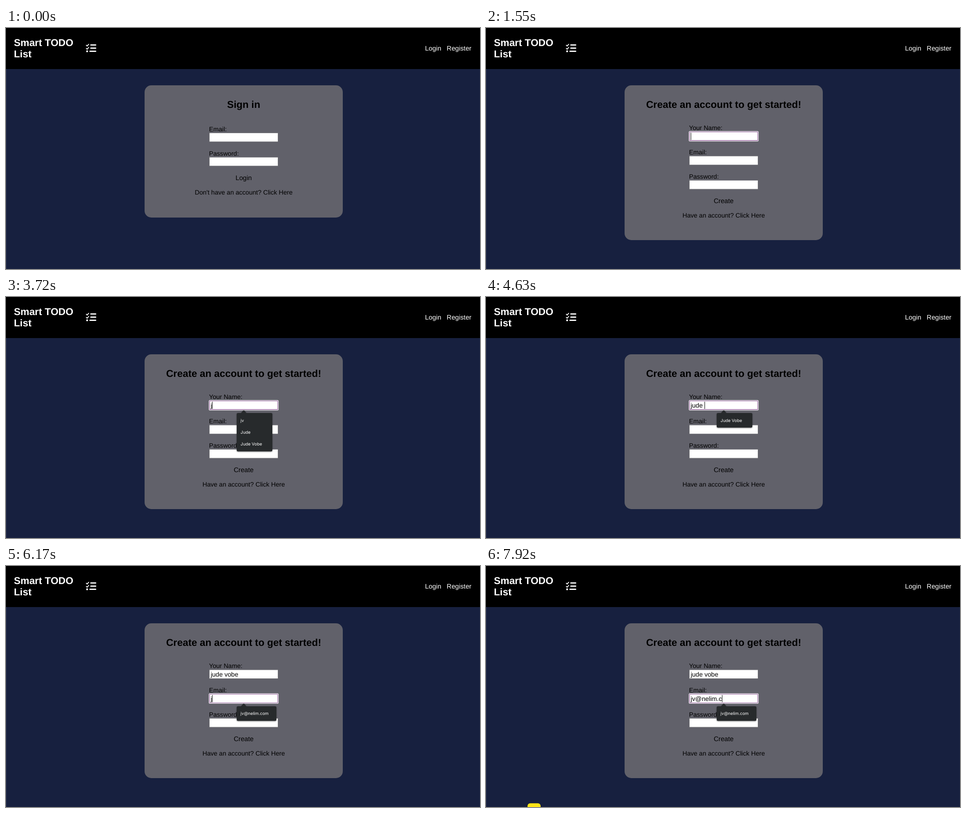
An HTML page for the animation above (7990 ms loop, 1050 by 534 pixels).

```html
<!DOCTYPE html>
<html lang="en">
<head>
<meta charset="utf-8">
<title>Smart TODO List</title>
<style>
  html, body { margin: 0; width: 100%; height: 100%; overflow: hidden; background: #17203f; }
  svg { display: block; width: 1050px; height: 534px; }
  text { font: 14.1px "Liberation Sans", Arial, sans-serif; text-rendering: geometricPrecision; white-space: pre; }
  .big { font-size: 22px; font-weight: bold; }
  .action { font-size: 14.7px; }
  .mid { text-anchor: middle; }
  .light { fill: #fff; }
  .card { fill: #61616a; }
  .field { fill: #fff; stroke: #76767a; stroke-width: .9; }
  .glow { fill: #fff; }
  .ring { fill: #fff; stroke: #82478a; stroke-width: 1.1; }
  .menu { fill: #272a2c; filter: drop-shadow(0 1px 1.5px rgba(0, 0, 0, .4)); }
  .option { font: 9.4px Inter, sans-serif; fill: #fff; }
  .glyph { fill: none; stroke: #fff; stroke-linecap: round; stroke-linejoin: round; }
</style>
</head>
<body>
<svg viewBox="0 0 1050 534">
  <rect width="1050" height="534" fill="#17203f"/>
  <rect y="91" width=".6" height="443" fill="#3b435c"/>
  <rect width="1050" height="91"/>
  <text class="big light" x="17.4" y="40">Smart TODO</text>
  <text class="big light" x="17.4" y="65.3">List</text>
  <g class="glyph">
    <path stroke-width="2.8" d="M188 37.7H198.6M188 44.7H198.6M186 51.7H198.6"/>
    <path stroke-width="1.9" d="M178 38.2l1.8 1.8 3.4-4M178 45.2l1.8 1.8 3.4-4"/>
  </g>
  <circle class="light" cx="179.7" cy="51.7" r="2.1"/>
  <text class="action light" x="928.2" y="50">Login</text>
  <text class="action light" x="976.3" y="50">Register</text>

  <g id="signin">
    <rect class="card" x="307" y="127" width="439" height="293" rx="15"/>
    <text class="big mid" x="526.5" y="177">Sign in</text>
    <text x="449.8" y="229">Email:</text>
    <rect class="field" x="450.5" y="232.5" width="152" height="19.5"/>
    <text x="449.8" y="283">Password:</text>
    <rect class="field" x="450.5" y="286.3" width="152" height="19.5"/>
    <text class="action mid" x="526.5" y="337.3">Login</text>
    <text class="mid" x="526.5" y="369.3">Don't have an account? Click Here</text>
  </g>

  <g id="signup">
    <rect class="card" x="307" y="127" width="439" height="343" rx="15"/>
    <text class="big mid" x="526.5" y="177">Create an account to get started!</text>
    <text x="449.8" y="226">Your Name:</text>
    <rect class="field" x="450.5" y="230" width="152" height="19.5"/>
    <text x="449.8" y="279.8">Email:</text>
    <rect class="field" x="450.5" y="283.8" width="152" height="19.5"/>
    <text x="449.8" y="333.6">Password:</text>
    <rect class="field" x="450.5" y="337.6" width="152" height="19.5"/>
    <text class="action mid" x="526.5" y="388.3">Create</text>
    <text class="mid" x="526.5" y="420">Have an account? Click Here</text>
    <g id="focus">
      <rect class="glow" x="449.2" y="228.4" width="154.6" height="22.8" rx="2.5"/>
      <rect class="ring" x="451" y="230.2" width="151" height="19.2" rx=".5"/>
    </g>
    <text id="name" x="453.4" y="245"></text>
    <text id="email" x="453.4" y="298.8"></text>
    <rect id="caret" y="232" width="1" height="16"/>
    <g id="menu">
      <g class="menu">
        <path d="M519.8 258L525.4 251.6Q526.6 250.4 527.8 251.6L533.4 258Z"/>
        <rect id="panel" x="511" y="257" rx="3"/>
      </g>
      <g id="options"></g>
    </g>
  </g>

  <rect id="dock" x="92" width="29" height="29" rx="6" fill="#ffe318"/>
</svg>
<script>
const $ = id => document.getElementById(id);
const LOOP = 7990, TICK = 70, FIRST = 500;
const SIGNUP = 500, FOCUS = 1550, OPEN = 1620, TAB = 5750;
const ROW = 26.35, FIELD_STEP = 53.8;

const fields = {
  name: {
    text: "jude vobe",
    keys: [3720, 4000, 4140, 4350, 4630, 4980, 5120, 5330, 5610],
    hints: ["jv", "ndvobe47", "Jude", "Jude Vobe", "Nodenam Vobe", "ndv"]
  },
  email: {
    text: "jv@nelim.c",
    keys: [6170, 6380, 6660, 7010, 7150, 7290, 7430, 7570, 7710, 7850],
    hints: ["jv@nelim.com"]
  }
};
const blinks = [2040, 2600, 3090, 3650];
const bounces = [5780, 7870], BOUNCE = 360, HEIGHT = 17;

const passed = (times, t) => times.filter(at => at <= t).length;
const typed = (field, t) => field.text.slice(0, passed(field.keys, t));
const show = (id, on) => $(id).setAttribute("visibility", on ? "inherit" : "hidden");

function drawMenu(hints, width) {
  $("panel").setAttribute("width", width);
  $("panel").setAttribute("height", 6.1 + ROW * hints.length);
  $("options").innerHTML = hints.map((hint, i) =>
    `<text class="option" x="519.6" y="${276.6 + ROW * i}">${hint}</text>`).join("");
}

function dockTop(t) {
  const start = bounces.find(at => t >= at && t < at + BOUNCE);
  if (start === undefined) return 540;
  const u = (t - start) / BOUNCE;
  return 534 - 4 * HEIGHT * u * (1 - u);
}

function draw(t) {
  const onEmail = t >= TAB;
  const id = onEmail ? "email" : "name";
  const field = fields[id];
  const value = typed(field, t);
  const shift = `translate(0 ${onEmail ? FIELD_STEP : 0})`;

  $("signin").setAttribute("visibility", t < SIGNUP ? "visible" : "hidden");
  $("signup").setAttribute("visibility", t < SIGNUP ? "hidden" : "visible");
  for (const key in fields) $(key).textContent = typed(fields[key], t);
  for (const part of ["focus", "caret", "menu"]) $(part).setAttribute("transform", shift);

  show("focus", t >= FOCUS);
  show("caret", t >= FOCUS && passed(blinks, t) % 2 === 0);
  $("caret").setAttribute("x", 453.5 + $(id).getComputedTextLength());

  show("menu", onEmail ? value : t >= OPEN);
  const hints = field.hints.filter(hint => hint.toLowerCase().startsWith(value));
  drawMenu(hints, onEmail ? 88 : value ? 79 : 96.7);

  $("dock").setAttribute("y", dockTop(t));
}

let last = -1;
function frame(now) {
  const t = now % LOOP;
  const step = t < FIRST ? 0 : FIRST + Math.floor((t - FIRST) / TICK) * TICK;
  if (step !== last) draw(last = step);
  requestAnimationFrame(frame);
}
draw(0);
requestAnimationFrame(frame);
</script>
</body>
</html>
```
